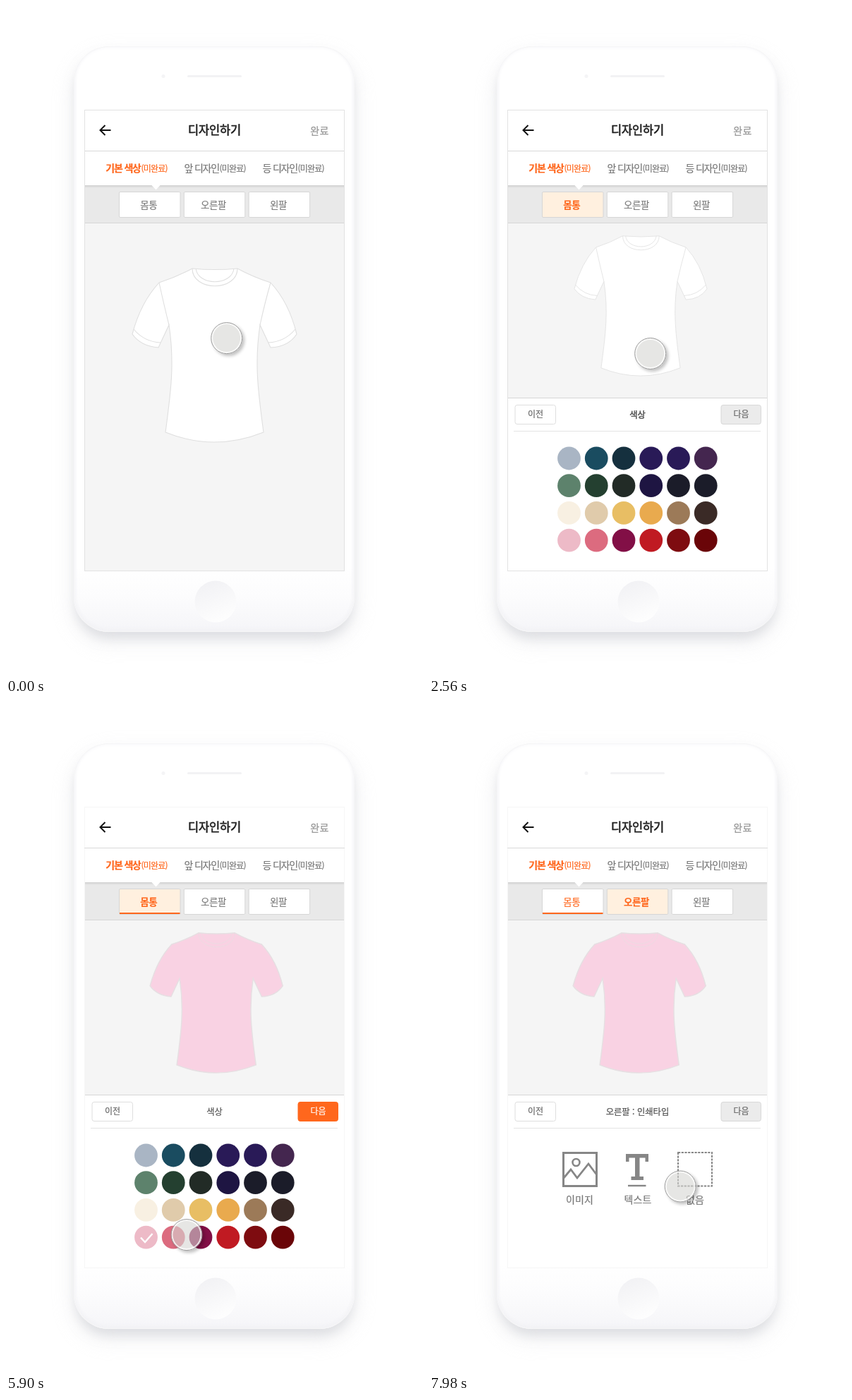
Write an HTML page that moves like this. It is 591 px wide and 948 px high and loops after 8 s.

```html
<!DOCTYPE html>
<html lang="ko">
<head>
<meta charset="utf-8">
<title>디자인하기</title>
<style>
  html, body { margin: 0; width: 100%; height: 100%; overflow: hidden; background: #fff; }
  #stage { position: absolute; left: 0; top: 0; width: 591px; height: 948px; overflow: hidden; }
  #phone {
    position: absolute; left: 96px; top: 57px; width: 398px; height: 830px; border-radius: 50px;
    background: linear-gradient(#fff 89%, #fcfcfd 94%, #f5f5f8);
    box-shadow: inset 0 0 0 1px #f6f6f7, inset 0 0 7px #f3f3f6, inset 0 -3px 6px #f1f1f4,
      0 12px 16px -3px rgba(205, 206, 212, .6), 0 14px 34px rgba(228, 228, 233, .45);
  }
  svg { position: absolute; left: 0; top: 0; }
  text {
    font-family: "Noto Sans CJK KR", "Noto Sans KR", "Noto Sans CJK", sans-serif;
    paint-order: stroke; stroke-linejoin: round;
  }
  #touch {
    position: absolute; left: -22.5px; top: -22.5px; width: 45px; height: 45px;
    box-sizing: border-box; border: 1.8px solid #9a9a9a; border-radius: 50%;
    background: rgba(213, 213, 211, .6); background-clip: padding-box;
    box-shadow: inset 0 0 0 2px rgba(255, 255, 255, .75), 3px 3px 4px rgba(0, 0, 0, .24);
  }
  #touch.down { box-shadow: inset 0 0 0 2px rgba(255, 255, 255, .75), 1px 1px 2px rgba(0, 0, 0, .16); }
</style>
</head>
<body>
<div id="stage">
  <div id="phone"></div>
  <svg id="view" width="591" height="948" viewBox="0 0 591 948"></svg>
  <div id="touch"></div>
</div>
<script>
const ORANGE = '#ff671d', GRAY = '#777', LOOP = 8000;

// "heft" thickens the strokes slightly, for weights between regular and bold.
const text = (x, y, s, size, fill, { weight = 400, anchor = 'middle', gap = 0, heft = .2 } = {}) =>
  `<text x="${x}" y="${y}" font-size="${size}" fill="${fill}" font-weight="${weight}" ` +
  `stroke="${fill}" stroke-width="${heft}" text-anchor="${anchor}" letter-spacing="${gap}">${s}</text>`;
const rect = (x, y, w, h, fill, more = '') =>
  `<rect x="${x}" y="${y}" width="${w}" height="${h}" fill="${fill}" ${more}/>`;
const path = (d, stroke, width = 1, fill = 'none') =>
  `<path d="${d}" stroke="${stroke}" stroke-width="${width}" fill="${fill}"/>`;

function tab(x, x2, label, on) {
  const fill = on ? ORANGE : GRAY;
  return text(x, 235, label, 14, fill, { weight: on ? 700 : 400, anchor: 'start', gap: -1.2 }) +
    text(x2, 235, '(미완료)', 12, fill, { anchor: 'start', gap: -.8 });
}

function chrome() {
  return `<defs>
      <linearGradient id="home" x1=".2" y1="0" x2=".6" y2="1">
        <stop offset="0" stop-color="#f1f1f4"/><stop offset="1" stop-color="#fefefe"/>
      </linearGradient>
      <linearGradient id="drop" x1="0" y1="0" x2="0" y2="1">
        <stop offset="0" stop-color="#cfcfcf"/><stop offset="1" stop-color="#e9e9e9"/>
      </linearGradient>
    </defs>
    <circle cx="297" cy="844" r="29.5" fill="url(#home)"/>
    <circle cx="223" cy="99.5" r="2.5" fill="#f4f4f6"/>` +
    rect(257, 98, 77, 3, '#f2f2f4', 'rx="1.5"') +
    rect(112, 148, 367, 106, '#fff') +
    path('M111 205.5H480', '#d9d9d9') +
    path('M148.5 176H134M140.5 169L133.5 176L140.5 183', '#111', 2) +
    text(295.5, 182, '디자인하기', 16.5, '#222', { gap: -.2, heft: .6 }) +
    text(444.5, 182, '완료', 14, '#999', { gap: .4, heft: .3 }) +
    tab(141.3, 191.5, '기본 색상', true) +
    tab(252.5, 302.5, '앞 디자인') +
    tab(363.5, 413.5, '등 디자인');
}

// Part buttons: each state is '' (idle), 'on' (active), 'set' (done) or 'on set'.
function parts(states) {
  let out = rect(112, 254, 367, 53, '#e9e9e9') + rect(112, 254, 367, 4, 'url(#drop)') +
    path('M112 307.5H479', '#d6d6d6') +
    '<path d="M206 253.5L212.5 260.5L219 253.5Z" fill="#fff"/>';
  ['몸통', '오른팔', '왼팔'].forEach((name, i) => {
    const x = 160 + i * 91.8, state = states[i] || '';
    const on = state.includes('on'), set = state.includes('set');
    out += rect(x + .5, 263.5, 86.5, 36, on ? '#fff0df' : '#fff', 'rx="1.5" stroke="#d6d6d6"') +
      (set ? rect(x + 1, 297, 85.5, 2, ORANGE) : '') +
      text(x + 42.3, 287, name, 13.5, on || set ? ORANGE : GRAY,
        { weight: on ? 700 : 400, gap: -.4, heft: .1 });
  });
  return out;
}

const OUTLINE = 'M264 372Q242 384 217 392Q191 420 179 465Q191 482 216 484L231 452' +
  'C239 505 234 545 226 604Q295 632 365 604C357 545 352 505 360 452L375 484' +
  'Q400 483 412 465Q401 420 375 392Q350 384 328 372Q296 375 264 372Z';
const SEAMS = 'M217 392Q224 424 231 452M375 392Q366 424 360 452' +
  'M181 458Q196 476 219 477M410 458Q395 476 372 477';
const COLLAR = 'M264 372C264 405 328 405 328 372M269 372C272 397 320 397 323 372';

function shirt(place, fill, stroke, seams) {
  return `<g transform="${place}">` + path(OUTLINE, stroke, seams ? 1.1 : 1.8, fill) +
    (seams ? path(SEAMS, stroke, 1.1) : '') + path(COLLAR, stroke, seams ? 1.1 : .8) + '</g>';
}
const small = x => `translate(${x} 26) scale(.807 .806)`;

function sheet(title, ready, heft) {
  return rect(112, 555, 367, 245, '#fff') +
    path('M112 555.5H479', '#d6d6d6') + path('M120 602.5H470', '#e4e4e4') +
    rect(122, 565.5, 57.5, 27, '#fff', 'rx="3" stroke="#dedede"') +
    text(151, 583, '이전', 12, '#666') +
    rect(414, 565.5, 56.5, 27, ready ? ORANGE : '#ebebeb',
      `rx="3" stroke="${ready ? ORANGE : '#d8d8d8'}"`) +
    text(442.5, 583, '다음', 12, ready ? '#fff' : '#666') +
    text(295.5, 584, title, 12.3, '#555', { heft });
}

const COLORS = `a9b5c4 1a4c60 15303e 291a57 291a57 44264f
  5d826c 244030 222b26 1e1542 1b1c29 1b1c29
  f8f0e2 e0cbab e8be64 e9aa4e 9c7a58 3a2a26
  edbac7 dc6b7f 820f46 c01a22 7e0c10 6a0508`.split(/\s+/);
const swatches = () => COLORS.map((c, i) =>
  `<circle cx="${198.5 + i % 6 * 38.75}" cy="${641 + Math.floor(i / 6) * 38.7}" r="16.4" fill="#${c}"/>`).join('');

function types() {
  const c = '#868686', label = { gap: .2 };
  return rect(190.5, 637.5, 47, 47, 'none', `stroke="${c}" stroke-width="3"`) +
    `<circle cx="208.5" cy="651" r="5" fill="none" stroke="${c}" stroke-width="2.6"/>` +
    path('M191 673L201 661L210 673L226 653L238 669', c, 2.8) +
    `<path d="M279 639H311V650H306.5V644.5H298.5V671H304V676H286.5V671H292V644.5H283.5V650H279Z" fill="${c}"/>` +
    path('M282 684H307.5', c, 2.4) +
    rect(353, 637, 48, 47.5, 'none', `stroke="${c}" stroke-width="2" stroke-dasharray="3.2 1.5"`) +
    text(213.5, 709, '이미지', 14, GRAY, label) +
    text(296, 709, '텍스트', 14, GRAY, label) +
    text(377, 709, '없음', 14, GRAY, label);
}

const backdrop = rect(112, 307, 367, 493, '#f5f5f5');
const pinkShirt = shirt(small(59.7), '#f9d2e3', '#e6dfe2', false);
const screens = [
  backdrop + parts([]) + shirt('', '#fff', '#dfdfdf', true),
  backdrop + parts(['on']) + shirt(small(61.5), '#fff', '#e2e2e2', true) +
    sheet('색상', false, .5) + swatches(),
  backdrop + parts(['on set']) + pinkShirt + sheet('색상', true, .2) + swatches() +
    path('M191 757.5L197 764L207.5 752', '#fff', 2.4),
  backdrop + parts(['set', 'on']) + pinkShirt + sheet('오른팔 : 인쇄타입', false, .25) + types()
];

const view = document.getElementById('view');
view.innerHTML = chrome() + screens.map(s => `<g class="screen">${s}</g>`).join('') +
  rect(111.5, 147.5, 368, 653, 'none', 'id="edge" stroke="#e2e2e2"');
const layers = [...view.querySelectorAll('.screen')];
const edge = document.getElementById('edge');
const touch = document.getElementById('touch');

const clamp = v => Math.min(1, Math.max(0, v));
const span = (t, a, b) => clamp((t - a) / (b - a));
const smooth = u => u * u * (3 - 2 * u);
const easeOut = u => 1 - (1 - u) ** 3;
const easeIn = u => u * u;

// Timing curve through (x1, 0) and (x2, 1), solved by bisection.
const timing = (x1, x2) => u => {
  let lo = 0, hi = 1, p = .5;
  for (let i = 0; i < 24; i++) {
    p = (lo + hi) / 2;
    const x = 3 * p * (1 - p) ** 2 * x1 + 3 * p * p * (1 - p) * x2 + p ** 3;
    if (x < u) lo = p; else hi = p;
  }
  return smooth(p);
};

// Point on a Bézier curve of any degree.
function bezier(pts, s) {
  while (pts.length > 1)
    pts = pts.slice(1).map((q, i) => q.map((v, k) => pts[i][k] + (v - pts[i][k]) * s));
  return pts[0];
}

const moves = [
  { from: 0, to: 1160, ease: easeOut, pts: [[312, 470], [335, 485], [322, 507], [313.2, 492]] },
  { from: 3640, to: 4740, ease: timing(.3, .65), pts: [[313.2, 492], [313, 797], [201.2, 764.5]] },
  { from: 5640, to: 6820, ease: smooth, pts: [[201.2, 764.5], [433, 725], [426.3, 588.7]] },
  { from: 7720, to: 7980, ease: easeIn, pts: [[426.3, 588.7], [404, 648], [355.7, 684.5]] }
];
const presses = [[2000, 2220], [5000, 5180], [6820, 7060]];
const fades = [[-1, 0], [2200, 2560], [5200, 5400], [7040, 7140]];

function render(t) {
  const m = moves.filter(v => t >= v.from).pop();
  const [x, y] = bezier(m.pts, m.ease(span(t, m.from, m.to)));
  touch.style.transform = `translate(${x}px, ${y}px)`;
  touch.classList.toggle('down', presses.some(([a, b]) => t >= a && t < b));
  layers.forEach((g, i) => g.setAttribute('opacity', span(t, ...fades[i])));
  edge.setAttribute('opacity', 1 - .7 * span(t, ...fades[2]));
}

const start = performance.now();
function tick() {
  render((performance.now() - start) % LOOP);
  requestAnimationFrame(tick);
}
tick();
</script>
</body>
</html>
```
